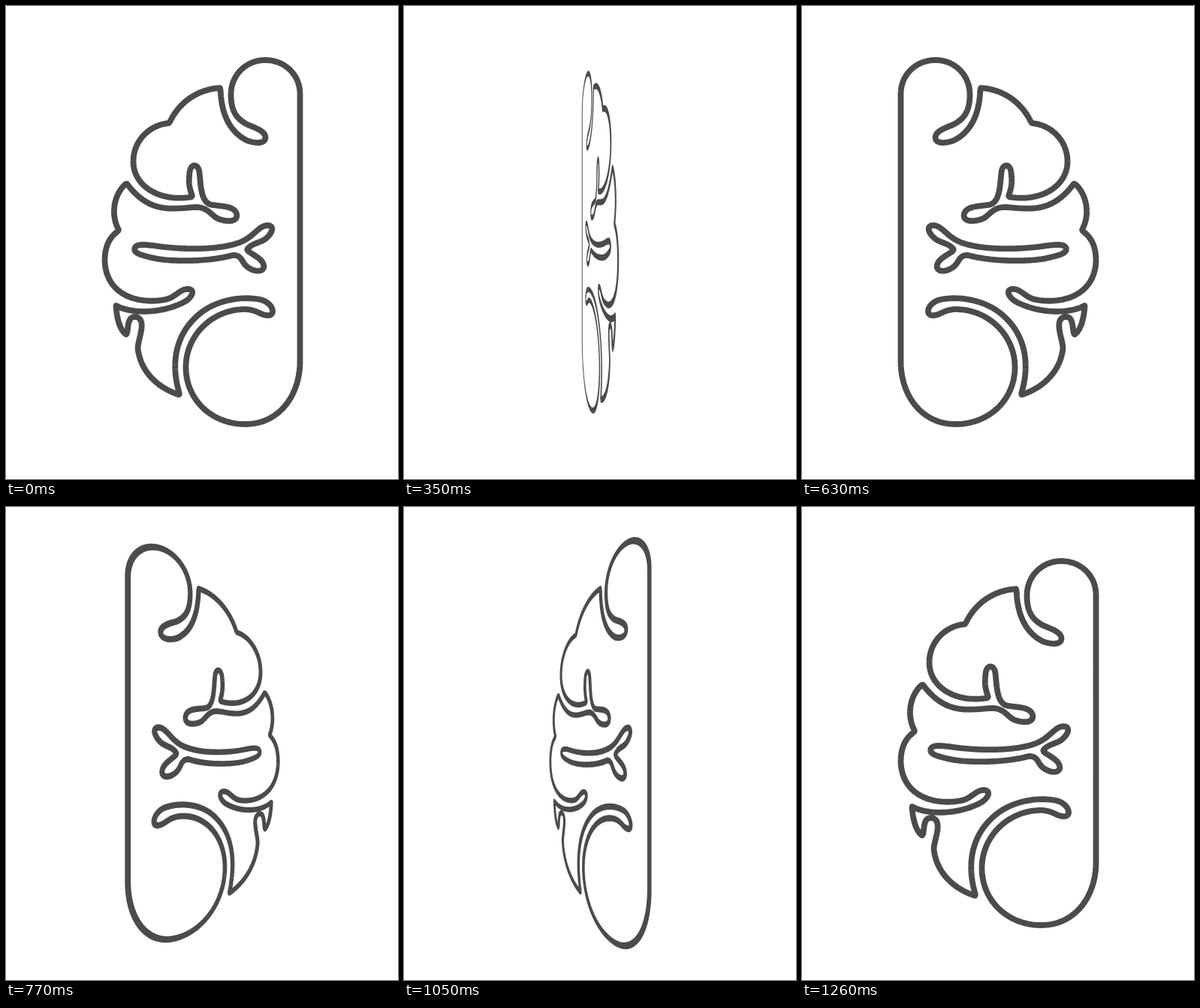
Animation of 522x630 px, one loop 1330 ms. Source, as an HTML page:

```html
<!DOCTYPE html>
<html lang="en">
<head>
<meta charset="utf-8">
<title>Turning half brain</title>
<style>
html, body { margin: 0; width: 100%; height: 100%; overflow: hidden; background: #fff; }
svg { display: block; width: 100vw; height: 100vh; }
</style>
</head>
<body>
<svg viewBox="0 0 522 630"><path id="ink" fill="#4b4b4d"/></svg>
<script>
const OUTLINES = [
  `M391 117 C391 91 370 72 345 72 C319 72 299 92 299 118
   C299 142 308 151 321 158 C331 162 346 167 345 176
   C344 184 331 183 320 179 C299 168 286 147 285 109
   C252 111 228 131 217 156 C190 158 169 180 169 207
   C169 241 206 262 248 254 C242 240 243 230 244 222
   C245 209 256 209 257 222 C259 236 258 264 275 265
   C290 267 306 267 307 279 C307 289 290 287 281 283
   C272 278 268 267 250 268 C220 270 190 277 160 236
   C143 250 138 278 150 299 C136 308 131 322 131 340
   C133 385 175 398 212 391 C226 388 231 376 243 377
   C252 378 247 388 239 393 C213 408 170 412 146 399
   C147 416 151 432 160 438 C163 430 160 412 173 414
   C188 418 175 444 175 456 C179 491 207 511 231 518
   C218 477 225 438 255 412 C278 391 315 386 338 391
   C353 394 360 410 350 412 C338 413 334 403 314 404
   C272 406 239 440 239 481 C239 524 273 557 318 557
   C363 557 391 519 391 473 Z`,
  `M171 322 C173 316 188 318 202 320 C240 325 286 325 313 314
   C331 306 336 292 349 292 C359 294 352 305 344 311
   C336 316 326 316 320 325 C330 333 343 337 343 348
   C340 357 325 352 319 346 C313 340 313 331 301 332
   C270 341 215 341 193 335 C180 332 168 329 171 322 Z`
];
const HALF = 3.9, SPACING = 3, SIDES = 10;
const AXIS = 267, DEPTH = 645, CX = 261.5, CY = 314.5;
const HOLD = 70, STEPS = 18, LOOP = HOLD * (STEPS + 1);

const ink = document.getElementById('ink');

// Sample an outline evenly along its length.
function sample(d) {
  const path = document.createElementNS('http://www.w3.org/2000/svg', 'path');
  path.setAttribute('d', d);
  const length = path.getTotalLength();
  const count = Math.round(length / SPACING);
  return Array.from({ length: count }, (_, i) => {
    const p = path.getPointAtLength(length * i / count);
    return [p.x, p.y];
  });
}

function disc([x, y]) {
  return Array.from({ length: SIDES }, (_, i) => {
    const a = -2 * Math.PI * i / SIDES;
    return [x + HALF * Math.cos(a), y + HALF * Math.sin(a)];
  });
}

function bar([x1, y1], [x2, y2]) {
  const len = Math.hypot(x2 - x1, y2 - y1) || 1;
  const nx = -(y2 - y1) / len * HALF, ny = (x2 - x1) / len * HALF;
  return [[x1 + nx, y1 + ny], [x2 + nx, y2 + ny], [x2 - nx, y2 - ny], [x1 - nx, y1 - ny]];
}

// The flat line drawing as small polygons, so the line weight follows perspective too.
const pieces = OUTLINES.map(sample).flatMap(pts =>
  pts.flatMap((p, i) => [disc(p), bar(p, pts[(i + 1) % pts.length])]));

function project(angle) {
  const cos = Math.cos(angle), sin = Math.sin(angle);
  let left = Infinity, right = -Infinity, top = Infinity, bottom = -Infinity;
  const polys = pieces.map(poly => poly.map(([px, py]) => {
    const scale = DEPTH / (DEPTH + (px - AXIS) * sin);
    const x = (px - AXIS) * cos * scale, y = (py - CY) * scale;
    left = Math.min(left, x);
    right = Math.max(right, x);
    top = Math.min(top, y);
    bottom = Math.max(bottom, y);
    return [x, y];
  }));
  // Keep the projected drawing centred on the stage.
  const dx = CX - (left + right) / 2, dy = CY - (top + bottom) / 2;
  return polys.map(poly => 'M' + poly.map(([x, y]) =>
    (x + dx).toFixed(2) + ' ' + (y + dy).toFixed(2)).join('L') + 'Z').join('');
}

const poses = Array.from({ length: STEPS }, (_, i) => project(2 * Math.PI * i / STEPS));
let shown = -1;

function draw(ms) {
  const step = Math.floor(ms % LOOP / HOLD) % STEPS;
  if (step === shown) return;
  shown = step;
  ink.setAttribute('d', poses[step]);
}

let start;
function tick(now) {
  start ??= now;
  draw(now - start);
  requestAnimationFrame(tick);
}
draw(0);
requestAnimationFrame(tick);
</script>
</body>
</html>
```
